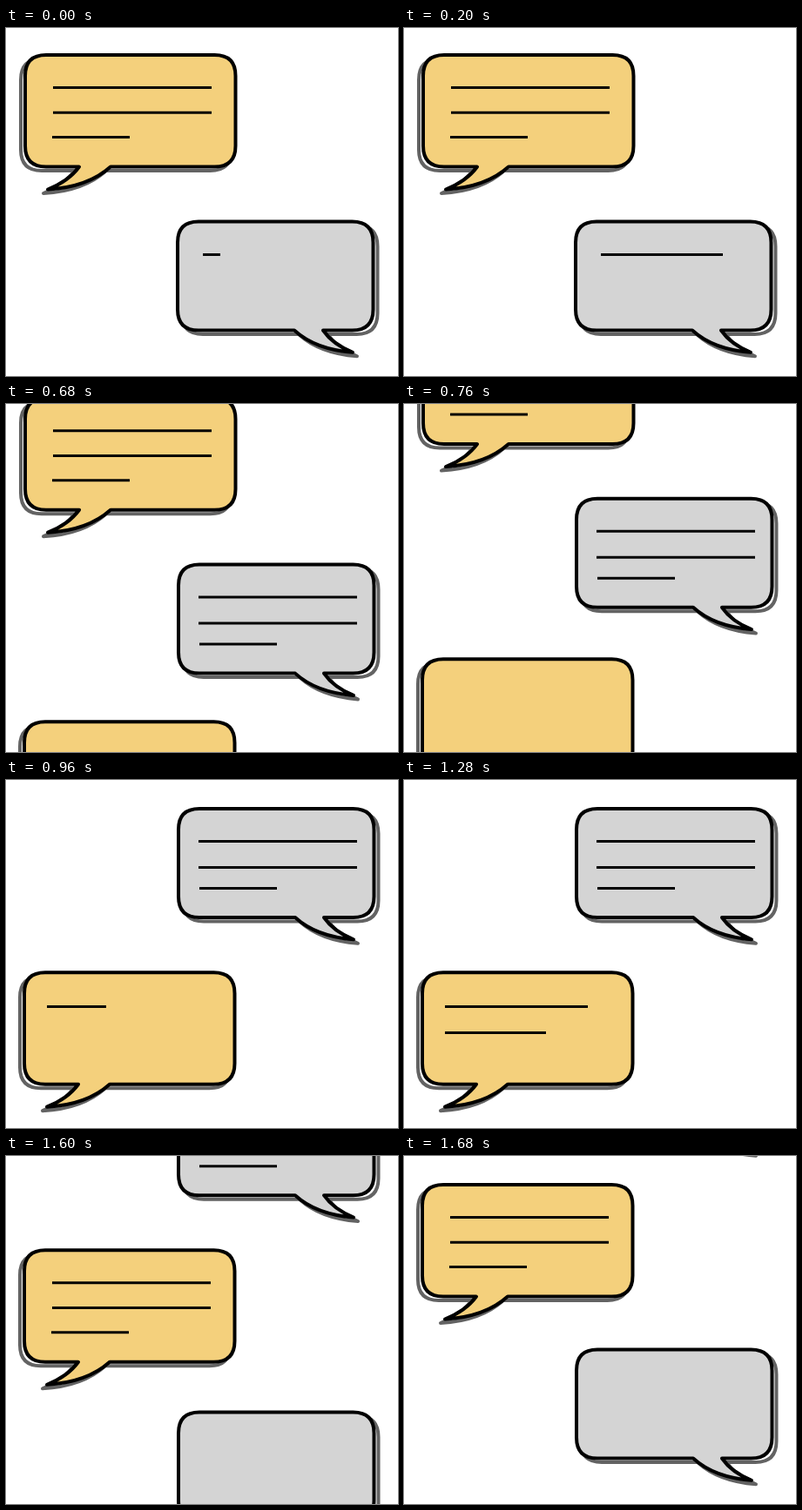
Recreate the animation shown at these times as an HTML page. Size 450x400 px, loop 1720 ms.

```html
<!DOCTYPE html>
<html lang="en">
<head>
<meta charset="utf-8">
<title>Chat bubbles</title>
<style>
  html, body { margin: 0; width: 100%; height: 100%; overflow: hidden; background: #fff; }
  svg { display: block; width: 100%; height: 100%; }
  path { fill: none; stroke: #000; stroke-width: 4; stroke-linejoin: round; }
  .shadow { stroke: #636363; }
  .text { stroke-width: 3; }
</style>
</head>
<body>
<svg id="stage" viewBox="0 0 450 400"></svg>
<script>
const STEP = 40, COUNT = 43;
const stage = document.getElementById('stage');

// Rounded box with a two-curve tail hanging from its lower edge.
function outline(w, h, r, tail) {
  return `M${r} 0H${w - r}Q${w} 0 ${w} ${r}V${h - r}Q${w} ${h} ${w - r} ${h}` +
    `${tail}H${r}Q0 ${h} 0 ${h - r}V${r}Q0 0 ${r} 0Z`;
}

const kinds = {
  yellow: {
    fill: '#f4d07c', dx: -5,
    shape: outline(241.5, 128.5, 24, 'H98Q72 152 26 154.5Q50 145 62 128.5'),
    full: 'M32 37.5H214M32 66.3H214M31 94.5H120'
  },
  gray: {
    fill: '#d4d4d4', dx: 5,
    shape: outline(224.5, 125, 24, 'H167Q178 141 201 150.3Q158 147 134 125'),
    full: 'M23 37.5H205M23 67.5H205M24 91.5H113'
  }
};

function add(parent, tag, attrs) {
  const el = document.createElementNS('http://www.w3.org/2000/svg', tag);
  for (const key in attrs) el.setAttribute(key, attrs[key]);
  return parent.appendChild(el);
}

function bubble(name) {
  const kind = kinds[name];
  const group = add(stage, 'g', {});
  add(group, 'path', { class: 'shadow', d: kind.shape, transform: `translate(${kind.dx} 4.5)` });
  add(group, 'path', { d: kind.shape, style: `fill:${kind.fill}` });
  const text = add(group, 'path', { class: 'text' });
  return (x, y, lines) => {
    group.setAttribute('transform', `translate(${x} ${y})`);
    text.setAttribute('d', lines === undefined ? kind.full : lines);
  };
}

// Three lines typed one after another, six steps each.
function typed(k, x, y) {
  let d = '';
  for (let j = 0; j < 3; j++) {
    const n = k - 6 * j;
    if (n >= 0) d += `M${x} ${y + 30 * j}h${Math.min(164, 20 + 24 * n)}`;
  }
  return d;
}

const top_ = bubble('yellow');
const gray = bubble('gray');
const next = bubble('yellow');
const last = bubble('gray');
const hide = draw => draw(0, 600, '');

function render(ms) {
  const i = Math.floor((ms + 0.5) / STEP) % COUNT;
  if (i < 16) {
    top_(22, 31);
    gray(197, 222.5, typed(i, 29, 38));
    hide(next);
    hide(last);
  } else if (i < 22) {
    const p = (i - 16) / 5;
    top_(22, 31 - 189 * p);
    gray(198, 222.5 - 189.5 * p);
    next(21, 401.2 - 180 * p, '');
    hide(last);
  } else if (i < 37) {
    hide(top_);
    gray(198, 33);
    next(21, 221.2, typed(i - 22, 26, 39.3));
    hide(last);
  } else {
    const p = (i - 37) / 5;
    hide(top_);
    gray(198, 33 - 188 * p);
    next(21, 221.2 - 188.2 * p);
    last(198, 402.5 - 180 * p, '');
  }
}

const start = performance.now();
function tick() {
  render(performance.now() - start);
  requestAnimationFrame(tick);
}
tick();
</script>
</body>
</html>
```
